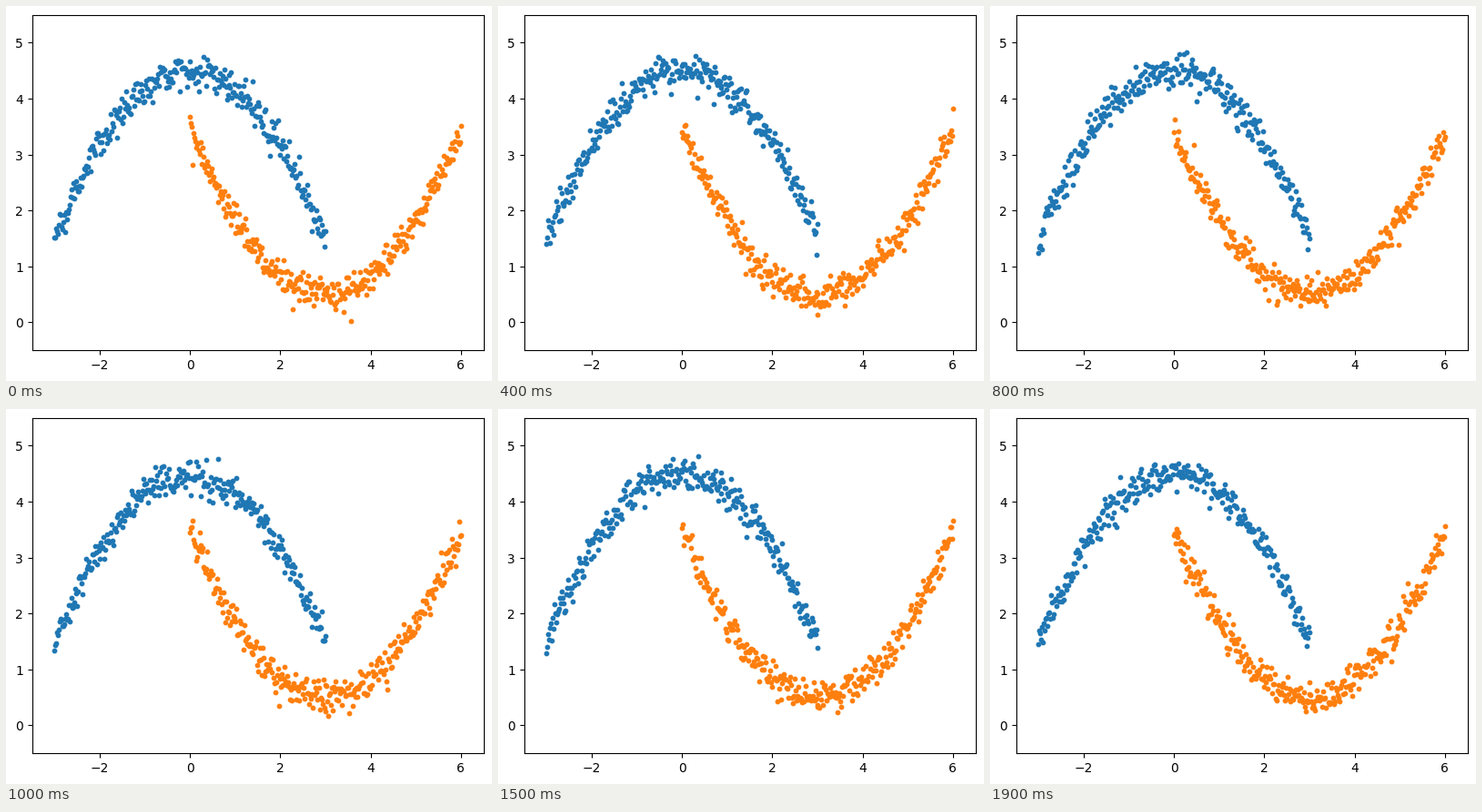
A matplotlib script that plays this animation: 534 px wide and 413 px high, repeating every 2400 ms.

```python
import numpy as np
import matplotlib.pyplot as plt
from matplotlib.animation import FuncAnimation
from matplotlib.transforms import Affine2D

W, H, DPI = 534, 413, 100
AX_LEFT, AX_BOTTOM, AX_W, AX_H = 28.6, 33.72, 496, 369.6  # pixels
LABEL_DROP = 0.35  # tick labels sit a fraction of a pixel below their ticks
STEP_MS, FRAMES, DRAWS = 100, 24, 20  # the last draw is held to the loop's end
POINTS, NOISE = 300, 0.15

plt.rcParams["font.family"] = "DejaVu Sans"
fig = plt.figure(figsize=(W / DPI, H / DPI), dpi=DPI, facecolor="white")
ax = fig.add_axes([AX_LEFT / W, AX_BOTTOM / H, AX_W / W, AX_H / H])
ax.set(xlim=(-3.5, 6.5), ylim=(-0.5, 5.5),
       xticks=range(-2, 7, 2), yticks=range(6))
drop = Affine2D().translate(0, -LABEL_DROP)
for label in ax.get_xticklabels() + ax.get_yticklabels():
    label.set_transform(label.get_transform() + drop)

x_top = np.linspace(-3, 3, POINTS)
x_bottom = np.linspace(0, 6, POINTS)
arcs = [
    (x_top, 4.5 - x_top ** 2 / 3, "tab:blue"),
    (x_bottom, 0.5 + (x_bottom - 3) ** 2 / 3, "tab:orange"),
]
dots = [ax.scatter(x, y, s=10, color=color) for x, y, color in arcs]


def update(i):
    """Scatter both arcs with fresh noise for this step."""
    rng = np.random.default_rng(min(i, DRAWS - 1))
    for (x, y, _), dot in zip(arcs, dots):
        dot.set_offsets(np.column_stack([x, y + rng.normal(0, NOISE, POINTS)]))
    return dots


anim = FuncAnimation(fig, update, frames=FRAMES, interval=STEP_MS,
                     init_func=lambda: update(0), repeat=True, repeat_delay=0)
plt.show()
```
